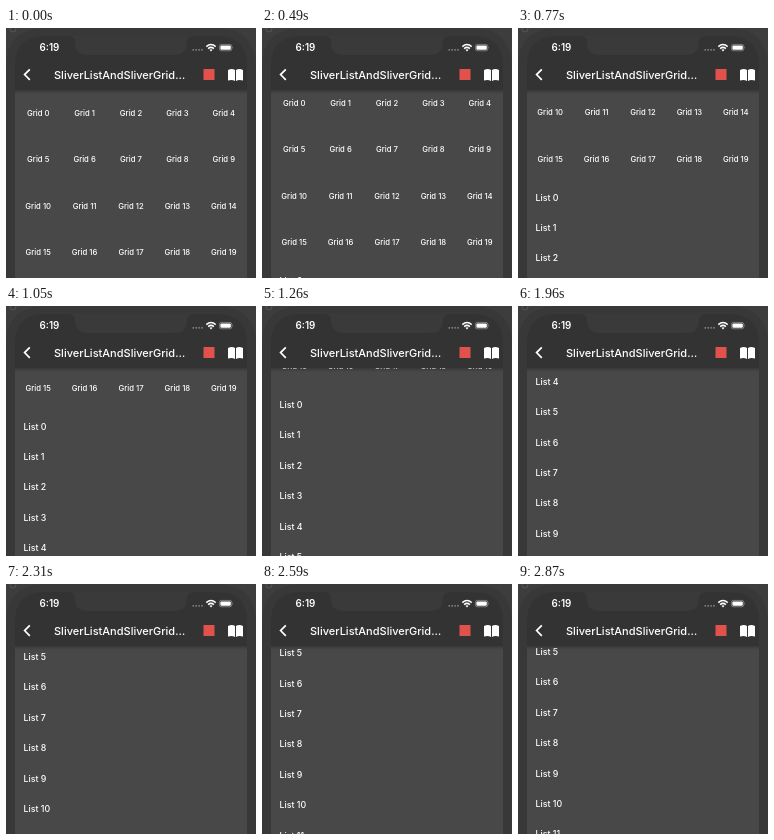
An HTML page that plays this animation: 250 by 250 pixels, repeating every 3.15 s.

```html
<!DOCTYPE html>
<html lang="en">
<head>
<meta charset="utf-8">
<style>
  html, body { margin: 0; width: 100%; height: 100%; overflow: hidden; background: #383838; }
  svg { display: block; width: 100vw; height: 100vh; }
  text { font-family: Inter, "Liberation Sans", sans-serif; fill: #fff; }
  .grid { font-size: 7.7px; font-weight: 500; text-anchor: middle; }
  .list { font-size: 8.8px; font-weight: 500; }
</style>
</head>
<body>
<svg viewBox="0 0 250 250">
  <defs>
    <clipPath id="body"><rect x="9" y="62" width="232" height="188"/></clipPath>
    <linearGradient id="shade" x2="0" y2="1">
      <stop stop-color="#000" stop-opacity=".22"/>
      <stop offset="1" stop-color="#000" stop-opacity="0"/>
    </linearGradient>
  </defs>

  <!-- phone -->
  <rect width="250" height="250" fill="#3d3d3d"/>
  <circle cx="7" cy="1" r="3" fill="none" stroke="#555"/>
  <path d="M0 250V40Q0 0 40 0H210Q250 0 250 40V250Z" fill="#383838"/>
  <path d="M9 250V38Q9 8 39 8H211Q241 8 241 38V250Z" fill="#333"/>
  <path d="M62 8Q69 8 69 14Q69 27 82 27H168Q181 27 181 14Q181 8 188 8Z" fill="#3a3a3a"/>

  <!-- scrolling content -->
  <rect x="9" y="62" width="232" height="188" fill="#484848"/>
  <g clip-path="url(#body)"><g id="content"></g></g>
  <rect x="9" y="62" width="232" height="4" fill="url(#shade)"/>

  <!-- status bar -->
  <text x="33.5" y="23" font-size="9.8" font-weight="600">6:19</text>
  <g fill="#888">
    <circle cx="187.3" cy="21.8" r=".9"/><circle cx="190.2" cy="21.8" r=".9"/>
    <circle cx="193.1" cy="21.8" r=".9"/><circle cx="196" cy="21.8" r=".9"/>
  </g>
  <g fill="none" stroke="#fff" stroke-width="1.5">
    <path d="M200.3 18.6Q205 14.4 209.7 18.6M202.1 20.6Q205 18.1 207.9 20.6"/>
    <path d="M203.5 21.8L205 23.5L206.5 21.8Q205 20.7 203.5 21.8Z" fill="#fff" stroke="none"/>
  </g>
  <rect x="213.4" y="16.4" width="12.4" height="6.4" rx="1.9" fill="none" stroke="#999" stroke-width=".7"/>
  <rect x="214.4" y="17.4" width="10.4" height="4.4" rx="1" fill="#fff"/>
  <path d="M226.6 18.5q1.2 1.1 0 2.2z" fill="#999"/>

  <!-- app bar -->
  <path d="M23.8 41.4L18.6 46.6L23.8 51.8" fill="none" stroke="#fff" stroke-width="1.7"/>
  <text x="48" y="50.6" font-size="11" font-weight="500">SliverListAndSliverGrid…</text>
  <rect x="197.5" y="41" width="11" height="11" fill="#e0524b"/>
  <path d="M222 42Q226 40 229 42V53Q226 51 222 52.6ZM230 42Q233 40 237 42V52.6Q233 51 230 53Z" fill="#fff"/>
</svg>
<script>
const STEP = 70, LOOP = 3150;
const TOP = 62, CELL = 46.4, ROW = 30.4, GRID_ROWS = 4;

// [step, scroll offset]: two drags, each coasting to a stop
const keys = [
  [0, 0], [4, 0], [5, 1], [7, 10], [9, 52], [11, 93.5], [13, 121.5], [15, 142.4],
  [18, 164], [21, 177.4], [22, 177.4], [23, 186.8], [25, 236], [27, 292],
  [30, 331], [33, 342], [37, 345.8], [41, 347], [45, 347]
];

const content = document.getElementById("content");

function addText(kind, label, x, y) {
  const node = document.createElementNS("http://www.w3.org/2000/svg", "text");
  node.setAttribute("class", kind);
  node.setAttribute("x", x);
  node.setAttribute("y", y);
  node.textContent = label;
  content.append(node);
}

for (let i = 0; i < GRID_ROWS * 5; i++) {
  addText("grid", `Grid ${i}`, 9 + CELL * (i % 5 + 0.5), TOP + CELL * (Math.floor(i / 5) + 0.5) + 2.8);
}
for (let i = 0; i < 14; i++) {
  addText("list", `List ${i}`, 17.5, TOP + CELL * GRID_ROWS + ROW * (i + 0.5) + 3.2);
}

const slope = i => (keys[i + 1][1] - keys[i][1]) / (keys[i + 1][0] - keys[i][0]);

// harmonic mean keeps the curve from overshooting
function tangent(i) {
  if (i === 0 || i === keys.length - 1) return 0;
  const a = slope(i - 1), b = slope(i);
  return a * b > 0 ? 2 * a * b / (a + b) : 0;
}

function scrollAt(step) {
  const i = keys.findIndex((key, n) => n && step <= key[0]) - 1;
  const [s0, y0] = keys[i], [s1, y1] = keys[i + 1];
  const span = s1 - s0, u = (step - s0) / span, v = 1 - u;
  return y0 * v * v * (1 + 2 * u) + y1 * u * u * (3 - 2 * u)
    + span * u * v * (tangent(i) * v - tangent(i + 1) * u);
}

function draw() {
  const step = Math.floor(performance.now() % LOOP / STEP);
  content.setAttribute("transform", `translate(0 ${-scrollAt(step)})`);
  requestAnimationFrame(draw);
}
draw();
</script>
</body>
</html>
```
